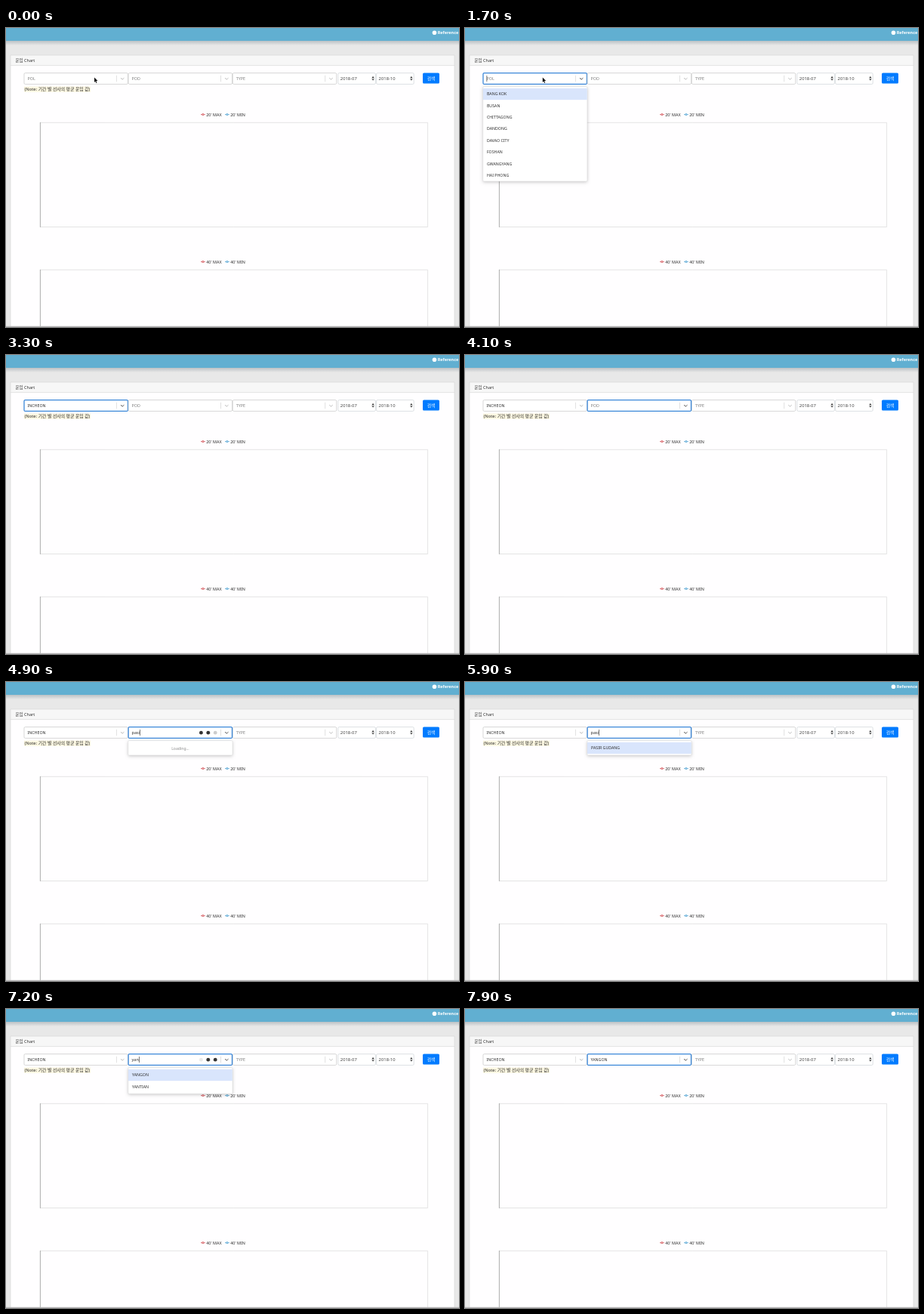
Write an HTML page with a canvas that moves like this. It is 600 px wide and 396 px high and loops after 8 s.

```html
<!DOCTYPE html>
<html lang="ko">
<head>
<meta charset="utf-8">
<title>운임 Chart</title>
<style>
html, body { margin: 0; width: 100%; height: 100%; overflow: hidden; background: #e8e8e8; }
canvas { display: block; width: 600px; height: 396px; }
</style>
</head>
<body>
<canvas id="stage"></canvas>
<script>
const W = 600, H = 396, LOOP = 8000, STEP = 100;
const canvas = document.getElementById('stage');
const ctx = canvas.getContext('2d');
const dpr = window.devicePixelRatio || 1;
canvas.width = W * dpr;
canvas.height = H * dpr;

const FONT = '"Noto Sans", "Noto Sans CJK KR", "Noto Sans CJK", sans-serif';
const INK = '#2c2c2c', GREY = '#808080', BLUE = '#3b87d9';
const ROW = 15.35;

const PORTS = ['BANG KOK', 'BUSAN', 'CHITTAGONG', 'DANDONG', 'DAVAO CITY', 'FOSHAN', 'GWANGYANG', 'HAI PHONG'];
const P_PORTS = ['PAITA', 'PANAMA CITY', 'PANGAON', 'PANJANG', 'PARANAGUA', 'PASIR GUDANG', 'PECEM', 'PEKANBARU'];
const Y_PORTS = ['YANGON', 'YANTIAN'];
const LOADING = 'Loading...';

// Each entry: start time, then the value that holds from there on.
const POL = {
  typed: [[0, ''], [2200, 'i'], [2400, 'in'], [2500, 'inc'], [2700, 'inch'], [3200, '']],
  menu: [[0, null], [1600, PORTS], [2400, LOADING], [2900, ['INCHEON']], [3200, null]],
  value: [[0, ''], [3200, 'INCHEON']],
  focus: [[0, false], [1600, true], [3600, false]],
  caret: [[0, false], [1600, true], [2000, false], [2200, true], [3200, false]],
  dots: [[0, null], [2200, 2150], [3000, null]]
};
const POD = {
  typed: [[0, ''], [4400, 'p'], [4600, 'pa'], [4700, 'pas'], [4900, 'pasi'],
    [6400, 'pas'], [6500, 'pa'], [6600, 'p'], [6700, ''], [6800, 'y'], [7000, 'ya'], [7100, 'yan'], [7600, '']],
  menu: [[0, null], [4400, LOADING], [5100, ['PASIR GUDANG']], [6500, P_PORTS], [6700, PORTS],
    [6800, LOADING], [7100, Y_PORTS], [7600, null]],
  value: [[0, ''], [7600, 'YANGON']],
  focus: [[0, false], [3600, true]],
  caret: [[0, false], [3600, true], [4100, false], [4200, true], [5400, false], [5900, true],
    [6200, false], [6400, true], [6600, false], [6700, true], [7600, false]],
  dots: [[0, null], [4400, 4535], [5100, null], [6800, 6420], [7400, null]]
};
const IDLE = { typed: [[0, '']], menu: [[0, null]], value: [[0, '']], focus: [[0, false]], caret: [[0, false]], dots: [[0, null]] };
const POINTER = [[0, 117], [1000, 113], [1100, 107], [1200, 102.8], [2200, null]];

const at = (track, t) => track.filter(k => k[0] <= t).pop()[1];
const clamp = v => Math.max(0, Math.min(1, v));

function box(x, y, w, h, fill) {
  ctx.fillStyle = fill;
  ctx.fillRect(x, y, w, h);
}

function round(x, y, w, h, r, fill, stroke, lw = 0.7) {
  ctx.beginPath();
  ctx.roundRect(x, y, w, h, r);
  if (fill) { ctx.fillStyle = fill; ctx.fill(); }
  if (stroke) { ctx.strokeStyle = stroke; ctx.lineWidth = lw; ctx.stroke(); }
}

function line(points, color, lw) {
  ctx.beginPath();
  points.forEach(([x, y]) => ctx.lineTo(x, y));
  ctx.strokeStyle = color;
  ctx.lineWidth = lw;
  ctx.stroke();
}

function disc(x, y, r, fill) {
  ctx.beginPath();
  ctx.arc(x, y, r, 0, 7);
  ctx.fillStyle = fill;
  ctx.fill();
}

// Set large and scaled down, so that advances stay fractional. Returns the width.
function text(s, x, y, size, color, align = 'left', weight = 400) {
  ctx.save();
  ctx.translate(x, y);
  ctx.scale(0.1, 0.1);
  ctx.font = `${weight} ${size * 10}px ${FONT}`;
  ctx.textAlign = align;
  ctx.fillStyle = color;
  ctx.fillText(s, 0, 0);
  const width = ctx.measureText(s).width / 10;
  ctx.restore();
  return width;
}

function page() {
  box(0, 0, W, H, '#e8e8e8');
  const shade = ctx.createLinearGradient(0, 16, 0, 23);
  shade.addColorStop(0, '#b4bbbf');
  shade.addColorStop(1, '#e8e8e8');
  box(0, 16, W, 7, shade);
  box(0, 0, W, 17, '#61afd1');
  disc(567.5, 6.3, 2.8, '#fff');
  text('Reference', 571.7, 8.4, 5.5, '#fff', 'left', 600);

  box(6, 36, 588, 360, '#fffeff');
  box(6, 36, 588, 13.5, '#f7f7f7');
  line([[6, 396], [6, 36], [594, 36], [594, 396]], '#d8d8d8', 0.7);
  line([[6, 49.6], [594, 49.6]], '#dcdcdc', 0.7);
  text('운임 Chart', 12.5, 45.2, 5.5, INK);

  box(24, 77.5, 88, 7.3, '#fdf8e2');
  text('(Note: 기간 별 선사의 평균 운임 값)', 24.5, 83.1, 5.85, INK);

  dateField(439.8, '2018-07');
  dateField(490.6, '2018-10');
  round(552, 59.5, 22, 14, 1.6, '#007bff');
  text('검색', 563, 68.8, 5.8, '#fff', 'center', 500);
  chart(125, '20');
  chart(320, '40');
}

function dateField(x, s) {
  round(x, 59.6, 49.6, 14.8, 1.5, '#fff', '#cfd4d9');
  text(s, x + 3, 69, 5.85, '#444');
  ctx.fillStyle = '#333';
  for (const d of [-1, 1]) {
    ctx.beginPath();
    ctx.moveTo(x + 44.6, 66.8 + d * 0.6);
    ctx.lineTo(x + 48, 66.8 + d * 0.6);
    ctx.lineTo(x + 46.3, 66.8 + d * 2.7);
    ctx.fill();
  }
}

function chart(top, size) {
  line([[45, top + 0.3], [558.6, top + 0.3], [558.6, top + 138.5], [45, top + 138.5]], '#dedede', 0.8);
  line([[45.4, top], [45.4, top + 138.8]], '#999', 0.8);
  legend(258, top - 10.4, `${size}' MAX`, '#d9666b');
  legend(290, top - 10.4, `${size}' MIN`, '#62acd8');
}

function legend(x, y, s, color) {
  line([[x, y], [x + 5.8, y]], color, 0.9);
  disc(x + 2.9, y, 1.5, color);
  disc(x + 2.9, y, 0.55, '#fff');
  text(s, x + 7.2, y + 2, 5.45, INK);
}

function select(x, label, state, t) {
  const focus = at(state.focus, t), typed = at(state.typed, t), value = at(state.value, t);
  round(x, 59.6, 137.4, 14.8, 1.5, '#fff', focus ? BLUE : '#c8c8c8', focus ? 1.3 : 0.7);
  line([[x + 122.4, 62.8], [x + 122.4, 71.2]], '#ccc', 0.6);
  line([[x + 128, 66.2], [x + 130.2, 68.2], [x + 132.4, 66.2]], focus ? '#555' : '#bbb', 1);

  let width = 0;
  if (typed) width = text(typed, x + 4.4, 69, 5.5, INK);
  else if (value) text(value, x + 4.4, 69, 5.3, INK);
  else text(label, x + 4.4, 69, 5.4, GREY);
  if (at(state.caret, t)) box(x + 4.6 + width, 63, 0.6, 8, '#222');

  const origin = at(state.dots, t);
  if (origin !== null) dots(x, t - origin);
}

function dots(x, age) {
  for (let i = 0; i < 3; i++) {
    const phase = ((age / 1000 - i * 0.16) % 1 + 1) % 1;
    ctx.globalAlpha = clamp(2.2 * (1 - Math.abs(phase - 0.4) / 0.4));
    disc(x + 96.3 + i * 9.4, 67.2, 2.4, '#333');
  }
  ctx.globalAlpha = 1;
}

function menu(x, items) {
  if (!items) return;
  const loading = items === LOADING;
  const rows = loading ? 1 : items.length;
  ctx.save();
  ctx.shadowColor = 'rgba(0,0,0,.22)';
  ctx.shadowBlur = 4 * dpr;
  ctx.shadowOffsetY = 1.2 * dpr;
  round(x - 0.3, 77.6, 138.2, 4 + rows * ROW - (rows > 7 ? 1.4 : 0), 1.5, '#fff');
  ctx.restore();
  round(x - 0.3, 77.6, 138.2, 4 + rows * ROW - (rows > 7 ? 1.4 : 0), 1.5, null, '#d8d8d8', 0.5);
  if (loading) {
    text(LOADING, x + 68.8, 89.5, 5.1, '#8c8c8c', 'center');
    return;
  }
  box(x - 0.1, 79.8, 137.8, ROW, '#d9e5fc');
  items.forEach((s, i) => text(s, x + 4.9, 89.4 + i * ROW, 5.25, INK));
}

function pointer(x) {
  if (x === null) return;
  const y = 65.5;
  ctx.beginPath();
  [[0, 0], [0, 6.4], [1.4, 5.1], [2.4, 7.4], [3.4, 7], [2.4, 4.7], [4.4, 4.6]]
    .forEach(([dx, dy]) => ctx.lineTo(x + dx, y + dy));
  ctx.closePath();
  ctx.strokeStyle = '#fff';
  ctx.lineWidth = 0.9;
  ctx.stroke();
  ctx.fillStyle = '#111';
  ctx.fill();
}

function draw(t) {
  ctx.setTransform(dpr, 0, 0, dpr, 0, 0);
  page();
  select(300.3, 'TYPE', IDLE, t);
  select(24, 'POL', POL, t);
  select(162.1, 'POD', POD, t);
  menu(24, at(POL.menu, t));
  menu(162.1, at(POD.menu, t));
  pointer(at(POINTER, t));
  box(0, 394.8, W, 1.2, '#b5b5b5');
}

const start = performance.now();
function tick() {
  const t = (performance.now() - start) % LOOP;
  draw(Math.floor(t / STEP) * STEP);
  requestAnimationFrame(tick);
}
tick();
</script>
</body>
</html>
```
